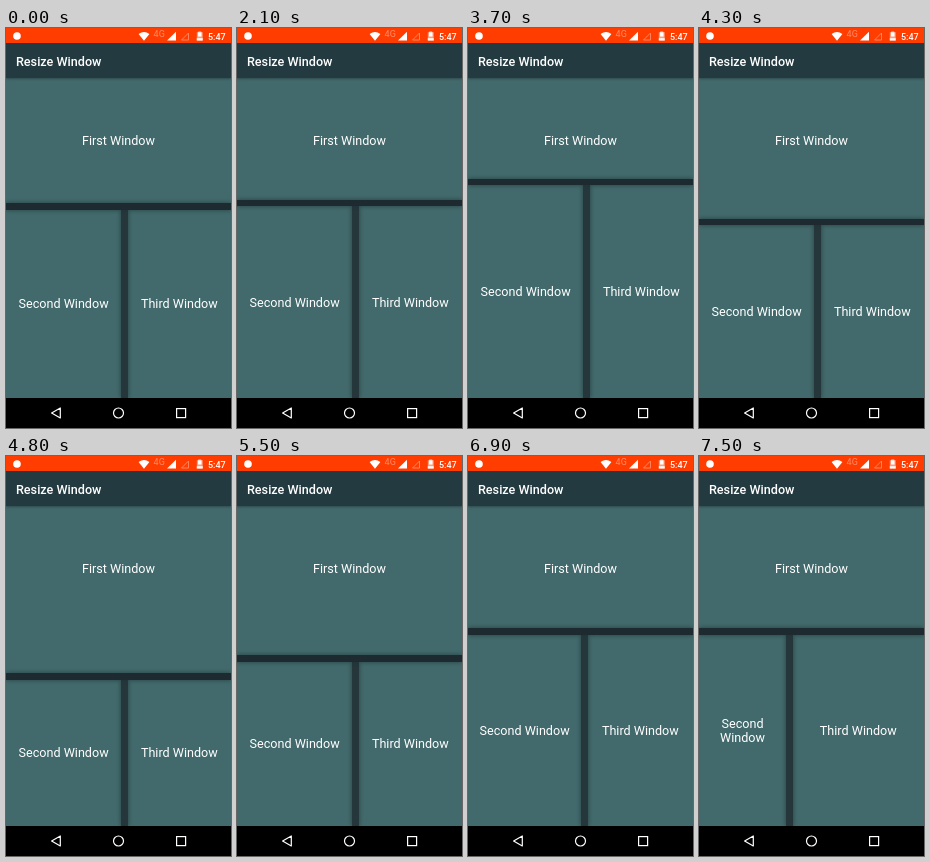
These frames come from a looping animation (225 by 400 pixels, 8000 ms). An HTML page:

```html
<!DOCTYPE html>
<html lang="en">
<head>
<meta charset="utf-8">
<title>Resize Window</title>
<style>
  html, body { margin: 0; width: 100%; height: 100%; overflow: hidden; background: #000; }
  #stage {
    position: relative; width: 225px; height: 400px; overflow: hidden;
    color: #fff; background: #42696b; font: 12.6px/14.65px Roboto, sans-serif;
  }
  #stage > * { position: absolute; box-sizing: border-box; }
  #first, .pane {
    display: flex; align-items: center; justify-content: center;
    box-sizing: border-box; padding-top: 2px; text-align: center;
  }
  #first { left: 0; top: 50px; width: 225px; height: 125px; }
  #lower { left: 0; width: 225px; bottom: 30px; overflow: hidden; }
  .pane { position: absolute; top: 0; bottom: 0; }
  #second { left: 0; }
  #third { right: 0; }
  .bar { position: absolute; background: #26373c; box-shadow: 0 0 4px #1c2e32b0; }
  #row { left: 0; width: 225px; height: 6.5px; background: #1d2b31; }
  #column { top: 0; bottom: 0; width: 6.5px; }
  #title {
    left: 0; top: 15px; width: 225px; height: 35px; padding-left: 10px;
    font-weight: 500; line-height: 37px; background: #233b40;
    box-shadow: 0 1px 2px #1c2e3280;
  }
  #nav { left: 0; top: 370px; }
  #status { left: 0; top: 0; background: #ff3d00; }
  svg text { font: 9px Roboto, sans-serif; }
  svg .clock { font-size: 9px; font-weight: 500; }
</style>
</head>
<body>
<div id="stage">
  <div id="first">First Window</div>
  <div id="lower">
    <div id="second" class="pane">Second Window</div>
    <div id="third" class="pane">Third Window</div>
    <div id="column" class="bar"></div>
  </div>
  <div id="row" class="bar"></div>
  <div id="title">Resize Window</div>
  <svg id="status" width="225" height="15" fill="#fff">
    <circle cx="11" cy="8" r="3.8"/>
    <path d="M138 12.7 132.6 6Q138 2.2 143.4 6Z"/>
    <text x="147.6" y="8.7" fill="#ff8c69">4G</text>
    <path d="M161 12.5H170V3.8Z"/>
    <path d="M175.5 12H182.5V5Z" fill="none" stroke="#ff8c69" stroke-width=".9"/>
    <path d="M190.8 4.3H192.3V3.3H195.2V4.3H196.7V12.6H190.8Z" fill="#ff9c7d"/>
    <path d="M192 4.3H195.5V8.5H192ZM190.8 10.3H196.7V12.6H190.8Z"/>
    <text class="clock" x="202" y="11.6">5:47</text>
  </svg>
  <svg id="nav" width="225" height="30" fill="none" stroke="#fff" stroke-width="1.2">
    <rect width="225" height="30" fill="#000" stroke="none"/>
    <path d="M45.6 15 54.3 10V20Z" stroke-linejoin="round"/>
    <circle cx="112.5" cy="15" r="5"/>
    <rect x="170.6" y="10.6" width="9" height="9"/>
  </svg>
</div>
<script>
  const LOOP = 8000, STEP = 100, BAR = 6.5, WIDTH = 225;
  // [time in ms, position in px] of each divider
  const rowKeys = [[2000, 175], [2100, 171.5], [3000, 138], [3300, 131], [3400, 131],
                   [4300, 190.5], [4800, 217], [5100, 217], [5500, 199], [6000, 172]];
  const columnKeys = [[6800, 115.2], [6900, 113.2], [7500, 87]];
  const [row, lower, column, second, third] =
    ['row', 'lower', 'column', 'second', 'third'].map(id => document.getElementById(id).style);

  function at(keys, t) {
    const i = keys.findIndex(key => key[0] > t);
    if (i === 0) return keys[0][1];
    if (i < 0) return keys[keys.length - 1][1];
    const [t0, v0] = keys[i - 1], [t1, v1] = keys[i];
    return v0 + (v1 - v0) * (t - t0) / (t1 - t0);
  }

  function draw(now) {
    const t = Math.floor(now % LOOP / STEP) * STEP;
    const y = at(rowKeys, t), x = at(columnKeys, t);
    row.top = y + 'px';
    lower.top = y + BAR + 'px';
    column.left = x + 'px';
    second.width = x + 'px';
    third.width = WIDTH - x - BAR + 'px';
    requestAnimationFrame(draw);
  }
  draw(performance.now());
</script>
</body>
</html>
```
